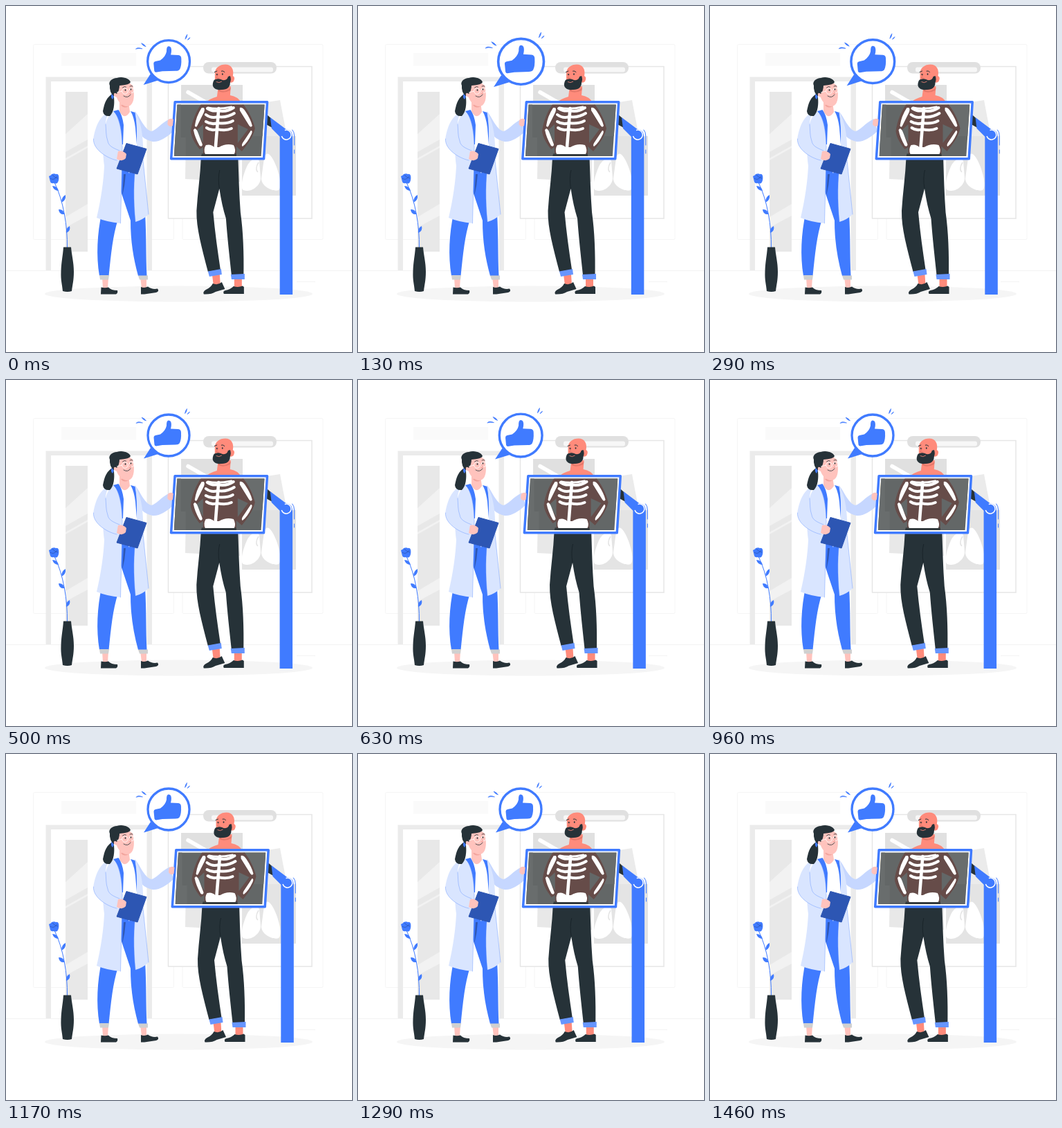
Animation, 500 px wide and 500 px high, one loop 1.5 s. Source, as an HTML page:

```html
<!DOCTYPE html>
<html lang="en">
<head>
<meta charset="utf-8">
<title>X-ray check</title>
<style>
  html, body { margin: 0; width: 100%; height: 100%; overflow: hidden; background: #fff; }
  svg { display: block; width: 100vw; height: 100vh; }
  .b { fill: #407bff; }
  .d { fill: #263238; }
  .w { fill: #fff; }
  .c { fill: #d9e5ff; }
  .s { fill: #ffc3bd; }
  .m { fill: #ff8b7b; }
  .l { fill: none; stroke: #407bff; stroke-linecap: round; }
  .k { fill: none; stroke: #263238; stroke-linecap: round; }
  .bone { fill: none; stroke: #fff; stroke-linecap: round; }
</style>
</head>
<body>
<svg viewBox="0 0 500 500">
  <!-- room -->
  <g fill="none" stroke="#f5f5f5">
    <rect x="39.500" y="55.500" width="203" height="282" rx="2"/>
    <rect x="255" y="55.500" width="203" height="282" rx="2"/>
    <path d="M0 382.500H500M420 398.500H447" stroke="#ebebeb" stroke-width=".6"/>
  </g>
  <rect x="80" y="68" width="108" height="18.500" fill="#fafafa"/>
  <path d="M57.500 382V102.500H211V382H203.500V109H65V382Z" fill="#ebebeb"/>
  <rect x="86" y="124" width="32" height="231" fill="#e8e8e8"/>
  <path d="M86 185L118 156V193L86 211ZM86 220L118 202V205L86 223ZM86 305L118 286V303L86 320Z" fill="#f2f2f2"/>
  <rect x="234.500" y="87.500" width="207.500" height="219.500" fill="#fff" stroke="#e6e6e6" stroke-width="1.500"/>
  <rect x="285" y="81" width="106" height="16.500" rx="8" fill="#e0e0e0"/>
  <rect x="297" y="88.500" width="89" height="7" rx="3" fill="#f7f7f7"/>

  <!-- pinned films -->
  <path d="M260 190L259 250L338 254V188Z" fill="#e8e8e8"/>
  <path d="M340 145L396 136L406 189H342Z" fill="#ebebeb"/>
  <rect x="253" y="114" width="89" height="78" fill="#e0e0e0"/>
  <path d="M263 124.500L290 140" class="bone" stroke-width="5.500"/>
  <rect x="341" y="188" width="78" height="86" fill="#e4e4e4"/>
  <path d="M366 224C362 216 354 222 349 230C342 244 338 264 343 266C350 270 367 263 368 249Z" class="w"/>
  <path d="M373 220C376 208 383 214 389 228C396 244 399 262 394 266C388 269 369 262 369 249Z" class="w"/>
  <path d="M365 226C361 232 361 238 364 240" fill="none" stroke="#e4e4e4" stroke-width="1.500"/>

  <ellipse cx="249.500" cy="416" rx="193.500" ry="11.500" fill="#f5f5f5"/>

  <!-- flower -->
  <path d="M88.500 349C89 318 83 281 70 255" class="l" stroke-width="1"/>
  <path d="M62 246Q65 245 66 243Q70 241.500 72 243Q75 242 76 245C77 249 76 254 74 256Q71 257 69 256Q65 257 64 254Q63 250 62 246Z" class="b"/>
  <path d="M64 249Q69 253 74 246M67 244Q70 248 75 249" fill="none" stroke="#2d56b3" stroke-width=".8"/>
  <path d="M67 260Q74 260 76 267Q69 267 67 260ZM80 284Q80 276 86 273Q87 281 80 284ZM76 294Q83 293 84.500 301Q77 302 76 294ZM87 328Q86 321 92 318Q94 325 87 328Z" class="b"/>
  <path d="M83 348.500H94C95 361 98 370 98 384C98 397 96 403 95 412Q89 414 82 412C81 401 79 397 79.500 384C80 369 82 362 83 348.500Z" class="d"/>

  <!-- doctor -->
  <g>
    <path d="M139 392H148L147 408H140ZM194 391H203V408H196Z" class="s"/>
    <path d="M137.500 406.500Q143 408 148 406.500Q152 411 161 411Q162 415 159 416.500H137Z" class="d"/>
    <path d="M195 406Q200 408 205 405.500Q211 410 219 408.500Q222 412 217 414L200 416.500H195Z" class="d"/>
    <path d="M138 300L162 308C154 333 152 357 148.500 390H135C130 360 132 329 138 300Z" class="b"/>
    <path d="M165 222L188 232L201 300C203 332 202 362 203.500 390H191C184 364 180 340 180 310L166 268Z" class="b"/>
    <path d="M173 243Q172 259 168 275L170 243Z" fill="#2d56b3"/>
    <path d="M135 389H149L148 395.500H136ZM191 389.500H205V395.500H193Z" fill="#d0d0d0"/>
    <path d="M162 151Q172 163 181 152L189 164L188 205L178 242L165 212V162Z" class="w"/>
    <path d="M155 152L162.500 150Q168 157 170 172L169 200L160 200ZM180 152L187 154Q190 168 189 200L187 176Q185 160 180 152Z" class="b"/>
    <path d="M186 152C194 160 199 178 210 181C217 180 224 169 237 163L242 181C232 190 221 197 212 196C201 194 196 188 192 183Z" fill="#c6d7ff"/>
    <path d="M155 152C164 160 169 180 168 218L165.500 314Q145 312 131 306C137 281 141 254 142 231C138 198 140 163 155 152Z" class="c"/>
    <path d="M187 154C197 170 199 196 198 222L206 301Q198 309 187 312C184 282 184 250 188 226Q191 185 187 154Z" class="c"/>
    <path d="M165.500 314L168 218C169 183 164 162 156 152M187 312C184 282 184 250 188 226M198 222L206 301" class="l" stroke-width=".35"/>
    <path d="M174 198.500L203 206.500L190 243L160 235Z" fill="#2d56b3" stroke="#2d56b3" stroke-linejoin="round"/>
    <path d="M155 152C137 154 130 172 126.500 190C124 207 146 220 160 223L164 209C154 205 148 202 147 195C144 187 145 180 144 171C144 161 148 154 155 152Z" class="c"/>
    <path d="M164 209C154 205 148 202 147 195C144 187 145 180 144 171M126.500 192C125 207 146 220 160 223" class="l" stroke-width=".35"/>
    <path d="M162 210Q169 208 174 214L173 220Q168 226 160 221Z" class="s"/>
    <!-- head -->
    <path d="M154 127C146 131 142 140 140 152Q141 160 150 159C156 153 157 142 156 132Z" class="d"/>
    <path d="M154 124Q158 129 154 135Q150 132 154 124Z" class="b"/>
    <path d="M164 134V152Q171 166 179 153L177 138Z" class="s"/>
    <path d="M166 143Q170 149 177 145V141Z" fill="#f2a59d"/>
    <path d="M159 116C163 108 179 109 183 115C186 126 186 140 179 144C171 148 162 139 160 132Q153 129 156 124Q158 123 160 126Z" class="s"/>
    <path d="M150 115C147 109 154 104 160 104C170 101 179 106 180 110Q179 114 164 115Q164 122 160 127Q155 123 156 131Q149 124 150 115Z" class="d"/>
    <g fill="none" stroke="#fff" stroke-width=".8">
      <circle cx="172" cy="123" r="4.300"/><circle cx="181.500" cy="122" r="3.500"/>
      <path d="M168 123L160 125"/>
    </g>
    <ellipse cx="172.500" cy="121.500" rx=".9" ry="1.300" class="d"/>
    <ellipse cx="180.500" cy="120.500" rx=".8" ry="1.200" class="d"/>
    <path d="M168.500 118Q171 115.500 173.500 117M179 116Q181 114.500 183 116M170 130Q176 134 180 128" class="k" stroke-width=".8"/>
    <path d="M178 122L180.500 126L178 127" fill="none" stroke="#ed847e" stroke-width=".7"/>
  </g>

  <!-- patient and scanner -->
  <g id="scan">
    <path d="M376 156L384 163L385 176L376 171Z" class="d"/>
    <path d="M382 161L406 179L398 191L384 177Z" class="b"/>
    <path d="M395.800 190Q396 179 405 178Q414 179 414.300 190V417H395.800Z" class="b"/>
    <path d="M398.500 188A7 7 0 1 0 403 179.500" fill="none" stroke="#fff" stroke-width="1.500"/>
    <path d="M414 179Q416.800 182 416.800 188V201M416.800 208V213" class="l" stroke-width="1"/>

    <path d="M298 388H309L310 404H300ZM330 393H341V408H330Z" class="m"/>
    <path d="M299 401Q306 404 312 399L316.500 409L303 413Q297 417 286 416.500Q284 413 289 410Q296 407 299 401Z" class="d"/>
    <path d="M329 405Q336 407 342 404.500L344 406V416H315Q313 412 317 411Q324 410 329 405Z" class="d"/>
    <path d="M282 219H335.500C336.500 246 337 272 339 298C343 327 344 358 343.500 389H326C323 360 320 335 318 307Q312 288 308.500 264L299.500 298C302 326 306 354 310 381L292 384C283 349 275 321 275.500 296C277 270 281 245 282 219Z" class="d"/>
    <path d="M308.500 264Q306 248 309 237" fill="none" stroke="#111c20" stroke-width=".6"/>
    <path d="M292 383.500L311 380L312 388L294 391ZM325 388L345 387V395H326Z" fill="#6695ff"/>

    <path d="M288 140Q294 134 305 131L307 116H325L324 129Q336 131 340 140Z" class="m"/>
    <path d="M307 120Q314 127 325 118L324 122Q314 127 307 123Z" fill="#e5786a"/>
    <path d="M302 98C302 89 309 84.500 317 84.500C326 84.500 330 92 328 101Q332 103 329 109Q326 112 323 110L314 118Q304 118 302 110Z" class="m"/>
    <path d="M324 101Q326 105 324 111C324 117 320 121 312 121C303 122 298 118 299 112Q300 106 303 106Q308 104 313 107Q320 108 321 102Z" class="d"/>
    <path d="M304 109.500Q308 112 312 109" fill="none" stroke="#ff8b7b" stroke-width=".8"/>
    <ellipse cx="305" cy="99" rx=".9" ry="1.300" class="d"/>
    <ellipse cx="313" cy="98.500" rx=".9" ry="1.300" class="d"/>
    <path d="M301.500 95.500L305 94M311.500 94Q314 93 316 95.500" class="k" stroke-width="1"/>
    <path d="M307 98L304 104H308" fill="none" stroke="#d96c60" stroke-width=".8"/>

    <path d="M244.300 138.700H377.700L372.700 220.800H238.800Z" class="w" stroke="#407bff" stroke-width="3.500" stroke-linejoin="round"/>
    <clipPath id="pane"><path d="M247.500 142.500H373.800L368.800 217H243Z"/></clipPath>
    <g clip-path="url(#pane)">
      <path d="M240 140H378V220H240Z" fill="#636767"/>
      <path d="M240 140H253V190H260V220H240ZM342 140H378V188H342Z" fill="#696d6d"/>
      <path d="M282 142H343C350 151 357 163 360 177C357 190 349 200 341 210L333 203V217H285V204L280 207C273 198 268 190 267 181C269 166 275 152 282 142Z" fill="#664c49"/>
      <path d="M285 171L275 180L285 198ZM335 171L350 178L335 198Z" fill="#636767"/>
      <path d="M283 213.500H333V218H282Z" fill="#343b3d"/>
      <g class="bone" stroke-width="4">
        <path d="M307.500 148L303 204" stroke-width="4.600"/>
        <path d="M291 148Q299 153 306 151Q318 154 329 147M289 157Q297 163 306 160Q319 162 330 155M289 167Q297 172 306 169Q319 171 328 166M290 176Q297 181 305 178Q318 181 326 177"/>
        <path d="M292 147Q306 150 326 146" stroke-width="3"/>
      </g>
      <path d="M289 201Q296 199 301 204H308Q318 198 329 201Q333 208 330 214H288Q285 207 289 201Z" class="w"/>
      <path d="M286 147Q288 149 286 154L276 174Q274 176 273 173Q275 159 283 147ZM273 177Q276 178 278 184L284 200Q284 204 280 202Q273 190 271 179ZM338 147Q342 146 346 152Q354 164 356 173Q354 177 351 172L338 151ZM354 180Q357 180 355 185Q349 198 342 203Q340 202 342 198Z" class="w"/>
    </g>
    <path d="M234 165Q238 161 242 164L241 173Q236 176 233.500 171Z" class="s"/>
  </g>

  <!-- approval bubble -->
  <g id="like" class="b">
    <path d="M209 98L199 113.500L220 107Z"/>
    <circle cx="235" cy="80" r="30" class="w" stroke="#407bff" stroke-width="3.300"/>
    <path d="M213.500 83Q213.500 80.500 216 80L223 78.500C228 75 231 71 232 66C232 60 233 58.500 235.500 58.500C239.500 59 239.500 65 238 70.500L249 71Q253 71.500 253 76Q253.500 86 251 91Q249.500 93.500 245 93.500L226 94L217 95.500Q215 95.500 214.500 93.500Z"/>
    <path d="M188 62.500Q190 59 197.500 62Q191 61 188 62.500ZM196 54Q200 55 202.500 59Q198 58 196 54ZM258.500 48.500Q259 44 261.500 41.500Q261.500 46 258.500 48.500ZM262 49.500Q263 47 265.500 46Q264.500 48.500 262 49.500Z" stroke="#407bff" stroke-width=".6"/>
  </g>
</svg>
<script>
  const LOOP = 1500, FPS = 24;
  // [loop share, value] pairs joined by straight lines
  const shake = [[0, 0], [.1, -1], [.2, 2], [.3, -4], [.4, 4], [.5, -4], [.6, 4], [.7, -4], [.8, 2], [.9, -1], [1, 0]];
  const beat = [[0, 1], [.1, 1.1], [.3, 1], [.4, 1], [.5, 1.1], [.6, 1], [1, 1]];
  const scan = document.getElementById('scan');
  const like = document.getElementById('like');

  function track(keys, p) {
    const i = keys.findIndex(k => k[0] > p);
    const [a, from] = keys[i - 1], [b, to] = keys[i];
    return from + (to - from) * (p - a) / (b - a);
  }

  function draw(ms) {
    const step = Math.floor(((ms + 4) % LOOP) * FPS / 1000);
    const p = (step + .5) / (LOOP * FPS / 1000);
    scan.setAttribute('transform', `translate(${track(shake, p).toFixed(3)} 0)`);
    like.setAttribute('transform', `translate(229 77) scale(${track(beat, p).toFixed(4)}) translate(-229 -77)`);
  }

  const start = performance.now();
  function tick() {
    draw(performance.now() - start);
    requestAnimationFrame(tick);
  }
  tick();
</script>
</body>
</html>
```
